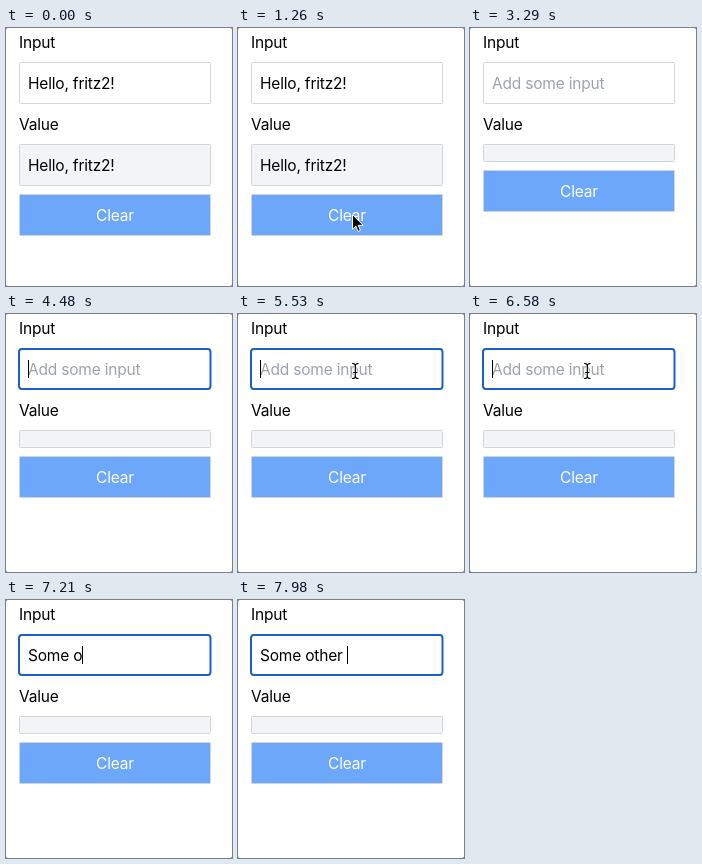
An HTML page for the animation above (8000 ms loop, 226 by 258 pixels).

```html
<!DOCTYPE html>
<html lang="en">
<head>
<meta charset="utf-8">
<title>Input binding</title>
<style>
  html, body { margin: 0; width: 100%; height: 100%; overflow: hidden; background: #777; }
  svg { display: block; width: 226px; height: 258px; background: #fff; border-radius: 2px; }
  text { font: 15.5px Inter, "Open Sans", sans-serif; letter-spacing: -.19px; white-space: pre; fill: #000; }
  .box { stroke: #d1d5db; }
  .hint { fill: #9ca3af; }
  .label { fill: #fff; text-anchor: middle; }
  .cursor { fill: #000; stroke: #fff; stroke-linejoin: round; }
</style>
</head>
<body>
<svg viewBox="0 0 226 258">
  <text x="13" y="20">Input</text>
  <rect class="box" x="13.5" y="34.5" width="191" height="41" rx="1" fill="#fff"/>
  <rect id="ring" x="13" y="35" width="191.5" height="40" rx="3" fill="none" stroke="#1b62bf" stroke-width="2"/>
  <text id="hint" class="hint" x="22" y="61">Add some input</text>
  <text id="field" x="22" y="61"></text>
  <rect id="caret" y="46" width="1" height="18"/>

  <text x="13" y="102">Value</text>
  <rect id="valueBox" class="box" x="13.5" y="116.5" width="191" height="41" rx="1" fill="#f3f4f6"/>
  <text id="value" x="22" y="143">Hello, fritz2!</text>

  <g id="button">
    <rect class="box" x="13.5" y="166.5" width="191" height="41" rx="1" fill="#6da7f9"/>
    <text class="label" x="109" y="193">Clear</text>
  </g>

  <path id="arrow" class="cursor" d="M114.5 186.6v14.6l3.3-3.1 2.2 5.3 2.4-1-2.2-5.1h4.9z"/>
  <path id="hand" class="cursor" d="M115.4 197.6v-9.2c0-2.2 2.9-2.2 2.9 0v4.8c.4-1.3 2.7-1.1 2.8.3.7-1 2.7-.7 2.8.6.9-.8 2.9-.3 2.9 1.4v3.2c0 2-1.5 3.2-1.5 5.8h-7.7c-.6-2.4-3.8-4.6-6.3-8-1-1.6.7-2.9 2.1-1.7z"
    style="fill:#fff;stroke:#000"/>
  <g id="beam" fill="none" stroke-linecap="round">
    <path id="beamShape" d="M114.5 49.5q2.8 0 2.8 2.2v10.6q0 2.2-2.8 2.2M120.1 49.5q-2.8 0-2.8 2.2v10.6q0 2.2 2.8 2.2M115.6 58.5h3.4" stroke="#fff" stroke-width="2.4"/>
    <use href="#beamShape" id="beamInk"/>
    <path d="M114.5 49.5q2.8 0 2.8 2.2v10.6q0 2.2-2.8 2.2M120.1 49.5q-2.8 0-2.8 2.2v10.6q0 2.2 2.8 2.2M115.6 58.5h3.4" stroke="#000" stroke-width="1.2"/>
  </g>
</svg>
<script>
  const LOOP = 8000, CLEAR = 3290, FOCUS = 4480;
  const typed = "Some other\u00a0";
  const keys = [6720, 6790, 6930, 7070, 7140, 7210, 7420, 7630, 7700, 7840, 7980];
  const $ = id => document.getElementById(id);
  const show = (id, on) => { $(id).style.visibility = on ? "visible" : "hidden"; };
  const within = (t, from, to) => t >= from && t < to;

  function draw(t) {
    const cleared = t >= CLEAR;
    const count = keys.filter(k => k <= t).length;
    const field = $("field");
    const content = cleared ? typed.slice(0, count) : "Hello, fritz2!";
    if (field.textContent !== content) field.textContent = content;

    show("hint", cleared && !count);
    show("value", !cleared);
    show("ring", t >= FOCUS);
    $("valueBox").setAttribute("height", cleared ? 17 : 41);
    $("button").setAttribute("transform", `translate(0 ${cleared ? -24 : 0})`);

    const width = count ? field.getComputedTextLength() : 0;
    $("caret").setAttribute("x", Math.round(22 + width));
    show("caret", within(t, FOCUS, 5040) || within(t, 5530, 6090) || t >= 6580);

    show("arrow", within(t, 1260, 1680));
    show("hand", within(t, 1680, 1750));
    show("beam", within(t, 5110, keys[0]));
  }

  const start = performance.now();
  function tick() {
    draw((performance.now() - start) % LOOP);
    requestAnimationFrame(tick);
  }
  $("beamInk").remove();
  tick();
</script>
</body>
</html>
```
